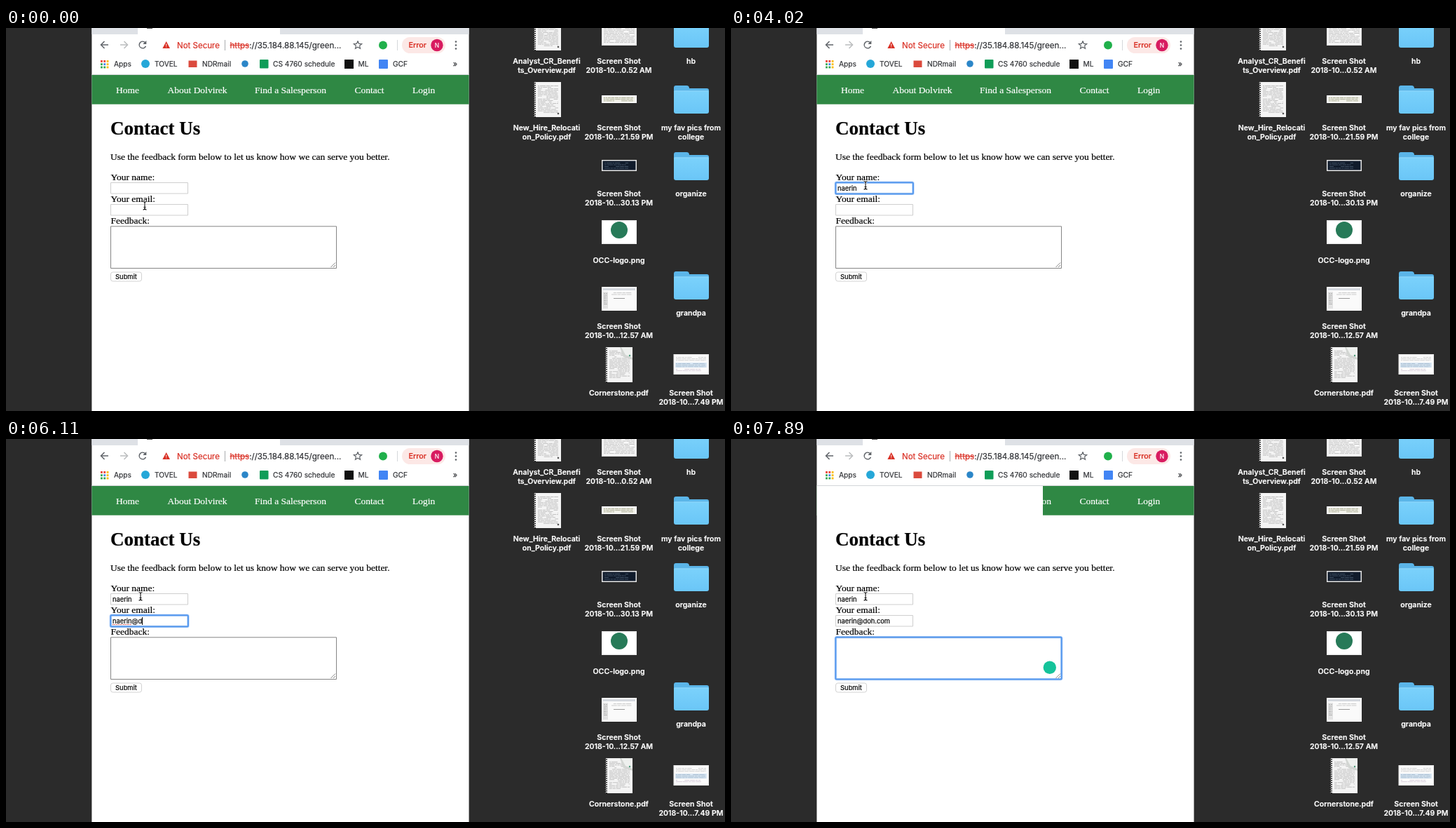
Recreate the animation shown at these times as an HTML page with a canvas. Size 1026 by 546 pixels, loop 8000 ms.

```html
<!DOCTYPE html>
<html lang="en">
<head>
<meta charset="utf-8">
<title>Contact form</title>
<style>
html, body { margin: 0; width: 100%; height: 100%; overflow: hidden; background: #2b2b2b; }
canvas { display: block; width: 1026px; height: 546px; }
</style>
</head>
<body>
<canvas id="stage"></canvas>
<script>
const W = 1026, H = 546, LOOP = 8000;
const LEFT = 122.4, WIDE = 538.2;
const SANS = 'Inter, "Liberation Sans", sans-serif';
const SERIF = '"Liberation Serif", "Times New Roman", serif';
const dpr = window.devicePixelRatio || 1;
const stage = document.getElementById('stage');
const backdrop = document.createElement('canvas');
for (const cv of [stage, backdrop]) { cv.width = W * dpr; cv.height = H * dpr; }
let g = backdrop.getContext('2d');
g.scale(dpr, dpr);

function rect(x, y, w, h, fill) { g.fillStyle = fill; g.fillRect(x, y, w, h); }

function box(x, y, w, h, r, fill, line, width = 1) {
  g.beginPath();
  g.roundRect(x, y, w, h, r);
  if (fill) { g.fillStyle = fill; g.fill(); }
  if (line) { g.strokeStyle = line; g.lineWidth = width; g.stroke(); }
}

function disc(x, y, r, fill) {
  g.beginPath();
  g.arc(x, y, r, 0, 7);
  g.fillStyle = fill;
  g.fill();
}

function path(points, line, width = 1, fill) {
  g.beginPath();
  for (let i = 0; i < points.length; i += 2) g.lineTo(points[i], points[i + 1]);
  if (fill) { g.closePath(); g.fillStyle = fill; g.fill(); }
  if (line) { g.strokeStyle = line; g.lineWidth = width; g.stroke(); }
}

// A hairline outline gives the slightly heavier look of smoothed screen type.
function text(str, x, y, font, color = '#000', align = 'left') {
  g.font = font;
  g.fillStyle = g.strokeStyle = color;
  g.textAlign = align;
  g.lineWidth = 0.2;
  g.lineJoin = 'round';
  g.fillText(str, x, y);
  g.strokeText(str, x, y);
  g.lineJoin = 'miter';
}

function widthOf(str, font) {
  g.font = font;
  return g.measureText(str).width;
}

const sans = (size, weight = 400) => `${weight} ${size}px ${SANS}`;
const serif = (size, weight = 400) => `${weight} ${size}px ${SERIF}`;

function seeded(seed) {
  return () => (seed = (seed * 16807) % 2147483647) / 2147483647;
}

// Desktop

function label(x, y, ...lines) {
  lines.forEach((s, i) => text(s, x, y + 4 + i * 13.4, sans(10.6, 600), '#fff', 'center'));
}

function scribble(x, y, w, h, step, color, seed) {
  const rnd = seeded(seed);
  for (let row = y; row < y + h; row += step) {
    for (let at = x; at < x + w;) {
      const len = Math.min(2 + rnd() * 7, x + w - at);
      if (rnd() < 0.88) rect(at, row, len, 0.9, color);
      at += len + 0.8;
    }
  }
}

function folder(x, y) {
  box(x, y, 22, 12, [3, 4, 0, 0], '#5bb5e8');
  box(x, y + 4, 50, 10, [2, 3, 0, 0], '#5bb5e8');
  const shade = g.createLinearGradient(0, y + 8, 0, y + 40);
  shade.addColorStop(0, '#7ad1fb');
  shade.addColorStop(1, '#6ac6f7');
  box(x, y + 7.5, 50, 32.5, [1, 1, 3, 3], shade);
  rect(x + 1, y + 7.5, 48, 0.8, '#97dafc');
}

function notebook(x, y, seed, curl) {
  rect(x + 2, y, 38, 50, '#f4f4f4');
  scribble(x + 7, y + 5, 29, 39, 2.1, '#b9b9b9', seed);
  for (let i = 1; i < 50; i += 3) {
    rect(x, y + i, 4, 1.4, '#161616');
    rect(x + 0.5, y + i, 2, 0.6, '#999');
  }
  if (curl) {
    path([x + 22, y, x + 40, y, x + 40, y + 18, x + 27, y + 14], null, 1, '#d3d6d3');
    path([x + 24, y, x + 40, y, x + 40, y + 15, x + 30, y + 11], null, 1, '#eef0ee');
    disc(x + 36, y + 12, 1.2, '#4a9a78');
  } else {
    disc(x + 36, y + 45, 1.3, '#555');
  }
}

function thumb(x, y, w, h, fill, edge) {
  rect(x, y, w, h, edge);
  rect(x + 1.5, y + 1.5, w - 3, h - 3, fill);
}

function drawDesktop() {
  rect(0, 0, W, H, '#2b2b2b');
  const [a, b, c] = [771.5, 874.5, 977.5];

  notebook(752, -18, 11);
  label(a, 47, 'Analyst_CR_Benefi', 'ts_Overview.pdf');
  notebook(752, 77, 29);
  label(a, 141.5, 'New_Hire_Relocati', 'on_Policy.pdf');

  thumb(850, -10, 50, 35, '#f8f8f8', '#e5e5e5');
  scribble(853, -4, 44, 26, 2.2, '#b8b8b8', 5);
  label(b, 47, 'Screen Shot', '2018-10...0.52 AM');
  thumb(850, 96, 50, 11, '#f2f2e9', '#fff');
  scribble(853, 99, 42, 5, 2.2, '#a3a58d', 8);
  label(b, 141.5, 'Screen Shot', '2018-10...21.59 PM');
  thumb(850, 188, 50, 16, '#101b2b', '#e6e6e6');
  scribble(854, 192, 34, 9, 2.5, '#45566a', 17);
  label(b, 236, 'Screen Shot', '2018-10...30.13 PM');
  thumb(850, 274, 50, 34, '#fff', '#f0f0f0');
  disc(875, 288, 12, '#277a58');
  label(b, 330.5, 'OCC-logo.png');
  thumb(850, 369, 50, 34, '#fafafa', '#fff');
  rect(852, 371, 46, 3, '#d5d9df');
  rect(852, 376, 7, 24, '#e3e3e3');
  scribble(853, 378, 5, 17, 2.5, '#a9a9a9', 3);
  scribble(864, 377, 29, 5, 2.5, '#c6c6c6', 7);
  rect(867, 385, 16, 1, '#999');
  label(b, 425, 'Screen Shot', '2018-10...12.57 AM');
  notebook(854, 455, 41, true);
  label(b, 519.5, 'Cornerstone.pdf');

  folder(953, -12);
  label(c, 47, 'hb');
  folder(953, 82);
  label(c, 141.5, 'my fav pics from', 'college');
  folder(953, 177);
  label(c, 236, 'organize');
  folder(953, 347);
  label(c, 406, 'grandpa');
  thumb(952.5, 465, 50.5, 29, '#fbfbfb', '#eee');
  scribble(956, 469, 43, 5, 2.2, '#cdcdcd', 23);
  rect(955, 477, 45, 7, '#d8e6f3');
  scribble(956, 478, 42, 5, 2.2, '#a5bacd', 31);
  scribble(956, 486, 36, 4, 2.2, '#d5cad8', 37);
  label(c, 519.5, 'Screen Shot', '2018-10...7.49 PM');
}

// Browser

function drawToolbar() {
  const ink = '#5f6368', dark = '#303236', red = '#d93025';
  rect(LEFT, 0, WIDE, 9, '#dee1e6');
  box(188, -6, 203, 15, 0, '#fff');
  rect(201, 0, 8, 1, '#555');

  path([146, 24, 135.5, 24], ink, 1.5);
  path([140.5, 19, 135.5, 24, 140.5, 29], ink, 1.5);
  path([163, 24, 173.5, 24], '#babcbe', 1.5);
  path([168.5, 19, 173.5, 24, 168.5, 29], '#babcbe', 1.5);
  g.beginPath();
  g.arc(195, 24, 4.8, 0.4, 5.5);
  g.strokeStyle = ink;
  g.lineWidth = 1.5;
  g.stroke();
  path([200.3, 18, 200.3, 23, 195.3, 23], null, 1, ink);

  path([228.7, 19, 234, 29, 223.4, 29], null, 1, red);
  rect(228.2, 22.5, 1, 3, '#fff');
  rect(228.2, 26.5, 1, 1, '#fff');
  text('Not Secure', 244, 28.5, sans(11.5), red);
  rect(312, 17, 1, 15, '#a9abae');
  const https = widthOf('https', sans(11.6));
  text('https', 319.5, 28.5, sans(11.6), red);
  rect(319.5, 24.3, https, 1, red);
  text('://35.184.88.145/green...', 319.5 + https, 28.5, sans(11.6), dark);

  const star = [];
  for (let i = 0; i <= 10; i++) {
    const r = i % 2 ? 2.7 : 6, turn = i * Math.PI / 5;
    star.push(502 + r * Math.sin(turn), 24.5 - r * Math.cos(turn));
  }
  path(star, ink, 1.2);
  disc(538, 24.5, 6, '#20b04b');
  rect(558, 17, 1, 15, '#d5d7da');
  box(565, 13, 62, 23, 11.5, '#fce8e6');
  text('Error', 574.5, 28.3, sans(10.8, 500), red);
  disc(615, 24.5, 8.7, '#d81b60');
  text('N', 615, 27.6, sans(8.5), '#fff', 'center');
  for (const y of [19.5, 24.5, 29.5]) disc(642, y, 1.3, ink);

  const [rose, gold, green, blue] = ['#ea4335', '#fbbc05', '#34a853', '#4285f4'];
  [rose, rose, gold, green, blue, gold, green, green, gold].forEach((color, i) =>
    rect(135 + (i % 3) * 4.3, 46 + Math.floor(i / 3) * 4.3, 2.8, 2.8, color));
  disc(199, 51, 6, '#25a7d8');
  rect(260.5, 46.5, 12, 9.5, '#db4a3d');
  disc(341, 51, 4.8, '#2b86c8');
  box(362, 45, 12.5, 12.5, 1, '#0f9d58');
  rect(483, 45, 13, 13, '#111');
  box(532, 45, 13, 13, 1, '#4285f4');
  const marks = { Apps: 154, TOVEL: 212, NDRmail: 280, 'CS 4760 schedule': 381, ML: 502.5, GCF: 552 };
  for (const name in marks) text(name, marks[name], 55, sans(10.2), dark);
  text('»', 641, 54.5, sans(11), dark, 'center');
  rect(LEFT, 66, WIDE, 1, '#d3d5d8');
}

function drawPage() {
  rect(LEFT, 67, WIDE, 41.7, '#2f8844');
  const links = { Home: 157, 'About Dolvirek': 230.5, 'Find a Salesperson': 355, Contact: 497.5, Login: 580 };
  for (const name in links) text(name, links[name], 93, serif(13.5), '#fff');
  text('Contact Us', 149, 151.5, serif(27, 700));
  text('Use the feedback form below to let us know how we can serve you better.', 149, 188, serif(13.5));
  text('Your name:', 149.5, 217, serif(13.5));
  text('Your email:', 149.5, 248, serif(13.5));
  text('Feedback:', 149.5, 279.3, serif(13.5));
  box(149.5, 220.5, 110, 15.5, 0, '#fff', '#cfcfcf');
  box(149.5, 251.5, 110, 15.5, 0, '#fff', '#cfcfcf');
  box(149.5, 282.8, 322, 59.7, 0, '#fff', '#858585');
  path([463.5, 341, 470, 334.5], '#777', 0.9);
  path([467, 341, 470, 338], '#777', 0.9);
  box(149.5, 348, 44, 13, 3, '#fff', '#d2d2d2');
  text('Submit', 171.5, 358, sans(9.4), '#000', 'center');
}

// Form activity

const areas = {
  name: { x: 149.3, y: 220.2, w: 110.6, h: 16.2 },
  mail: { x: 149.3, y: 251.2, w: 110.6, h: 16.2 },
  note: { x: 149.3, y: 282.6, w: 322.4, h: 60 }
};
const school = 'nd7kt@halverin.edu', home = 'naerindoh17@tilvo.com';
const people = [['Naerin Doh', school], ['Naerin Doh', home]];
const all = [...people, ['Taekyoung (Doris) Mo', '']];
const matches = [...people, ['Naerin', school]];
const mails = [[school, 'Naerin Doh'], [home, 'Naerin Doh']];

// Each step changes only the listed values.
const steps = [
  [0, { mouse: [198, 253], name: '', mail: '', focus: '', caret: false, rows: null, typo: false, badge: false, wipe: false }],
  [150, { mouse: [192, 224] }],
  [290, { focus: 'name', caret: true }],
  [440, { rows: all }],
  [890, { caret: false }],
  [1340, { caret: true }],
  [1930, { caret: false }],
  [2230, { name: 'n', caret: true, rows: matches }],
  [2380, { name: 'nae' }],
  [2820, { name: 'naeri' }],
  [2970, { name: 'naerin' }],
  [3420, { caret: false }],
  [4020, { rows: null }],
  [4170, { focus: 'mail', caret: true }],
  [4620, { caret: false }],
  [5060, { mail: 'n', caret: true, rows: mails }],
  [5210, { mail: 'na', rows: mails.slice(1) }],
  [5360, { mail: 'naer' }],
  [5510, { mail: 'naerin' }],
  [5960, { mail: 'naerin@', rows: null, typo: true }],
  [6110, { mail: 'naerin@d' }],
  [6250, { mail: 'naerin@do', typo: false }],
  [6400, { mail: 'naerin@doh' }],
  [6700, { mail: 'naerin@doh.' }],
  [6850, { mail: 'naerin@doh.c' }],
  [7000, { mail: 'naerin@doh.com' }],
  [7300, { focus: 'note', caret: false }],
  [7440, { caret: true, badge: true }],
  [7740, { caret: false }],
  [7890, { wipe: true }]
];

function stateAt(t) {
  const state = {};
  for (const [start, change] of steps) if (t >= start) Object.assign(state, change);
  return state;
}

function drawFocus({ x, y, w, h }) {
  box(x, y, w, h, 1.5, null, 'rgba(90,155,240,.4)', 3.4);
  box(x, y, w, h, 1.5, null, '#5598ee', 2);
}

function drawPopup(top, rows) {
  const rule = top + 13.8 + rows.length * 30.4;
  g.save();
  g.shadowColor = 'rgba(0,0,0,.3)';
  g.shadowBlur = 3 * dpr;
  g.shadowOffsetY = dpr;
  box(149, top, 203, rule + 35 - top, 2, '#fff');
  g.restore();
  box(149.3, top + 0.3, 202.4, rule + 34.4 - top, 2, null, '#cfcfcf', 0.7);
  rows.forEach(([main, side], i) => {
    const y = top + 26.2 + i * 30.4;
    text(main, 159.5, y, sans(10.4), '#202124');
    text(side, 341.5, y, sans(10.4), '#5f6368', 'right');
  });
  rect(149.5, rule, 202, 1, '#e3e4e6');
  text('Manage...', 159.5, rule + 21.7, sans(10.4), '#5f6368');
}

function drawBeam([x, y]) {
  g.beginPath();
  for (const side of [-2.5, 2.5]) {
    g.moveTo(x + side, y - 5.5);
    g.quadraticCurveTo(x, y - 5.5, x, y - 3.5);
    g.lineTo(x, y + 4);
    g.quadraticCurveTo(x, y + 6, x + side, y + 6);
  }
  g.moveTo(x - 1.5, y + 2.5);
  g.lineTo(x + 1.5, y + 2.5);
  for (const [color, width] of [['rgba(255,255,255,.8)', 2.6], ['#111', 1.1]]) {
    g.strokeStyle = color;
    g.lineWidth = width;
    g.stroke();
  }
}

function drawForm(s) {
  const font = sans(9.3), start = 152;
  if (s.focus) drawFocus(areas[s.focus]);
  text(s.name, start, 232, font);
  text(s.mail, start, 263.2, font);
  if (s.typo) {
    const end = start + widthOf('naerin', font);
    for (let x = start; x < end; x += 2.5) rect(x, 264, 1.5, 1, '#e0443c');
  }
  if (s.badge) disc(454.8, 325.8, 9.2, '#15c39a');
  if (s.rows) drawPopup(s.focus === 'name' ? 237 : 268, s.rows);
  if (s.caret) {
    const x = start + widthOf(s[s.focus] || '', font);
    rect(Math.round(x), Math.round(areas[s.focus].y) + 3, 1, 11, '#000');
  }
  if (s.wipe) rect(LEFT, 67, 445 - LEFT, 42, '#fff');
  drawBeam(s.mouse);
}

drawDesktop();
rect(LEFT, 0, WIDE, H, '#fff');
drawToolbar();
drawPage();

g = stage.getContext('2d');
g.scale(dpr, dpr);

const begin = performance.now();
function frame() {
  g.drawImage(backdrop, 0, 0, W, H);
  drawForm(stateAt((performance.now() - begin) % LOOP));
  requestAnimationFrame(frame);
}
frame();
</script>
</body>
</html>
```
